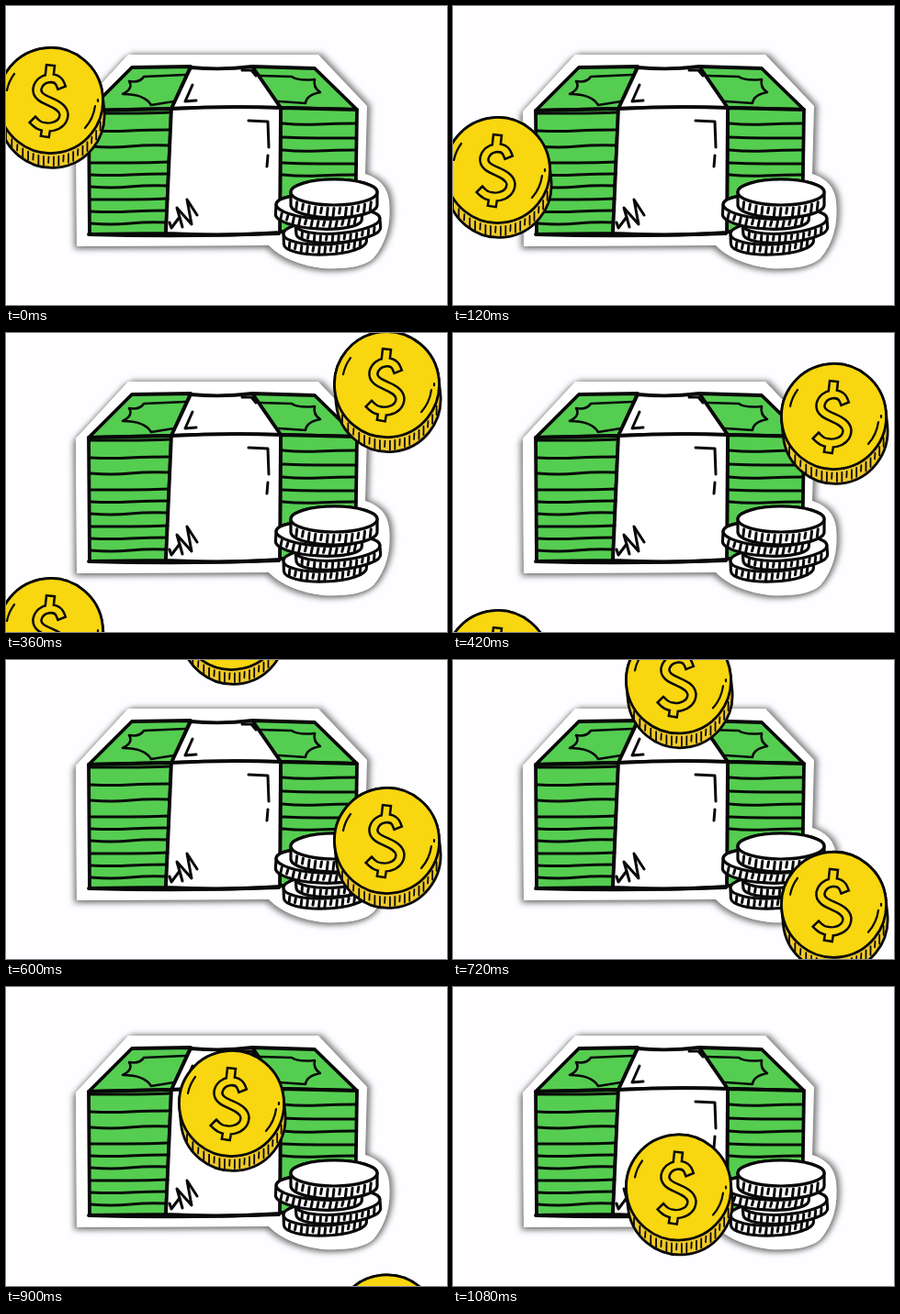
Animation, 480 px wide and 326 px high, one loop 1140 ms. Source, as an HTML page with a canvas:

```html
<!DOCTYPE html>
<html>
<head>
<meta charset="utf-8">
<title>Falling coins</title>
<style>
html, body { margin: 0; width: 100%; height: 100%; overflow: hidden; background: #fefdff; }
canvas { display: block; }
</style>
</head>
<body>
<canvas id="stage" width="480" height="326"></canvas>
<script>
const ctx = document.getElementById('stage').getContext('2d');
const LOOP = 1140, STEP = 60;
const GREEN = '#55cd51', INK = '#080808', GOLD = '#f8d610', RIM = '#efc92a';
ctx.lineCap = ctx.lineJoin = 'round';

function shape(d, fill, width = 3.8, color = INK) {
  const p = new Path2D(d);
  if (fill) { ctx.fillStyle = fill; ctx.fill(p); }
  if (width) { ctx.lineWidth = width; ctx.strokeStyle = color; ctx.stroke(p); }
}

// A disc seen at an angle: rim below, hatched, then the face
function disc(x, y, rx, ry, depth, tilt, face, rim, width, hatches, hatchWidth) {
  ctx.save();
  ctx.translate(x, y);
  ctx.rotate(tilt);
  ctx.strokeStyle = INK;
  ctx.lineWidth = width;
  ctx.beginPath();
  ctx.ellipse(0, 0, rx, ry, 0, Math.PI, 0);
  ctx.ellipse(0, depth, rx, ry, 0, 0, Math.PI);
  ctx.closePath();
  ctx.fillStyle = rim;
  ctx.fill();
  ctx.stroke();
  ctx.lineWidth = hatchWidth;
  ctx.beginPath();
  for (let i = 1; i < hatches; i++) {
    const k = 1 - 2 * i / hatches;
    const px = rx * k, py = ry * Math.sqrt(1 - k * k);
    ctx.moveTo(px, py + depth * .25);
    ctx.lineTo(px - 1, py + depth * (i % 3 ? .85 : .65));
  }
  ctx.stroke();
  ctx.lineWidth = width;
  ctx.beginPath();
  ctx.ellipse(0, 0, rx, ry, 0, 0, 7);
  ctx.fillStyle = face;
  ctx.fill();
  ctx.stroke();
  ctx.restore();
}

function sticker() {
  const edge = 'M133 53L340 53L393 109L391 183Q414 190 417 212Q421 250 400 275Q386 288 345 286Q306 281 286 261L77 262L76 115Z';
  for (const [dx, dy] of [[-3, 3], [4, -1]]) {
    ctx.save();
    ctx.shadowColor = 'rgba(70, 70, 70, .65)';
    ctx.shadowBlur = 6;
    ctx.shadowOffsetX = dx;
    ctx.shadowOffsetY = dy;
    shape(edge, '#fff', 0);
    ctx.restore();
  }
}

function cash() {
  shape('M90 114L137 67L201 66L180 112Z', GREEN);
  shape('M268 66L336 68L382 113L299 111Z', GREEN);
  shape('M90 114L180 112L174 248L91 249Z', GREEN);
  shape('M299 111L382 113L380 246L298 246Z', GREEN);
  shape('M201 67Q235 70 268 66L299 111Q240 109 180 112Z', '#fff');
  shape('M180 112Q240 109 299 111L298 247Q240 251 174 248Z', '#fff');
  shape('M90 249Q190 252 297 248');

  [117, 136, 153, 171, 184, 197, 211, 224, 237].forEach((y, i) =>
    shape(`M92 ${y}Q115 ${y + i % 3} 135 ${y}T${179 - i / 2} ${y - 1}`, null, 3));
  [128, 143, 157, 171, 184].forEach((y, i) =>
    shape(`M301 ${y}Q320 ${y + 2 - i % 2} 340 ${y + 1}T381 ${y + i % 2}`, null, 3));

  shape('M195 75L150 77Q146 84 134 82Q139 90 127 96Q151 96 158 108L183 104', null, 2.6);
  shape('M276 76L311 77Q318 82 336 80Q334 89 342 94Q327 97 326 106L297 104', null, 2.6);
  shape('M203 86L195 104L207 103M257 70L267 70L272 76', null, 3);
  shape('M264 125L285 126L286 154M285 163L284 175', null, 3);
  shape('M178 236L180 242L189 230L192 241L186 220L202 238L197 211L208 228', null, 3);
}

function silver() {
  [[347, 247, 45, 13, 11, -.04], [361, 235, 46, 13, 10, -.08], [341, 219, 47, 13, 11, .06], [357, 203, 47, 14, 14, 0]]
    .forEach(coin => disc(...coin, '#fff', '#fff', 3.2, 14, 3));
}

function goldCoin(x, y) {
  ctx.save();
  ctx.translate(x, y);
  disc(57.5, 58, 57, 57.5, 16, -.1, GOLD, RIM, 2.8, 21, 1.8);
  const sign = 'M68 40C64 30 46 32 43 45C41 60 70 58 72 73C72 88 50 91 41 82M57 24L56 33M53 87L52 93';
  ctx.lineCap = 'square';
  shape(sign, null, 11.5);
  shape(sign, null, 6.5, GOLD);
  ctx.lineCap = 'round';
  shape('M10 47Q12 37 18 29M106 64Q104 78 95 88M109 59L109 57', null, 2.2);
  ctx.restore();
}

// Each coin: left edge, then [time, top] points
const coins = [
  [-9, [0, 45], [240, 197], [420, 302], [540, 372]],
  [357, [0, -211], [420, 33], [600, 139], [1140, 453]],
  [188, [540, -140], [600, -105], [780, -1], [900, 69], [1140, 191]]
];

function topAt(points, t) {
  for (let i = 1; i < points.length; i++) {
    const [t0, y0] = points[i - 1], [t1, y1] = points[i];
    if (t >= t0 && t < t1) return y0 + (y1 - y0) * (t - t0) / (t1 - t0);
  }
  return null;
}

function draw(now) {
  const t = Math.floor(now % LOOP / STEP) * STEP;
  ctx.fillStyle = '#fefdff';
  ctx.fillRect(0, 0, 480, 326);
  sticker();
  cash();
  silver();
  for (const [x, ...points] of coins) {
    const y = topAt(points, t);
    if (y !== null) goldCoin(x, y);
  }
  requestAnimationFrame(() => draw(performance.now() - start));
}

const start = performance.now();
draw(0);
</script>
</body>
</html>
```
